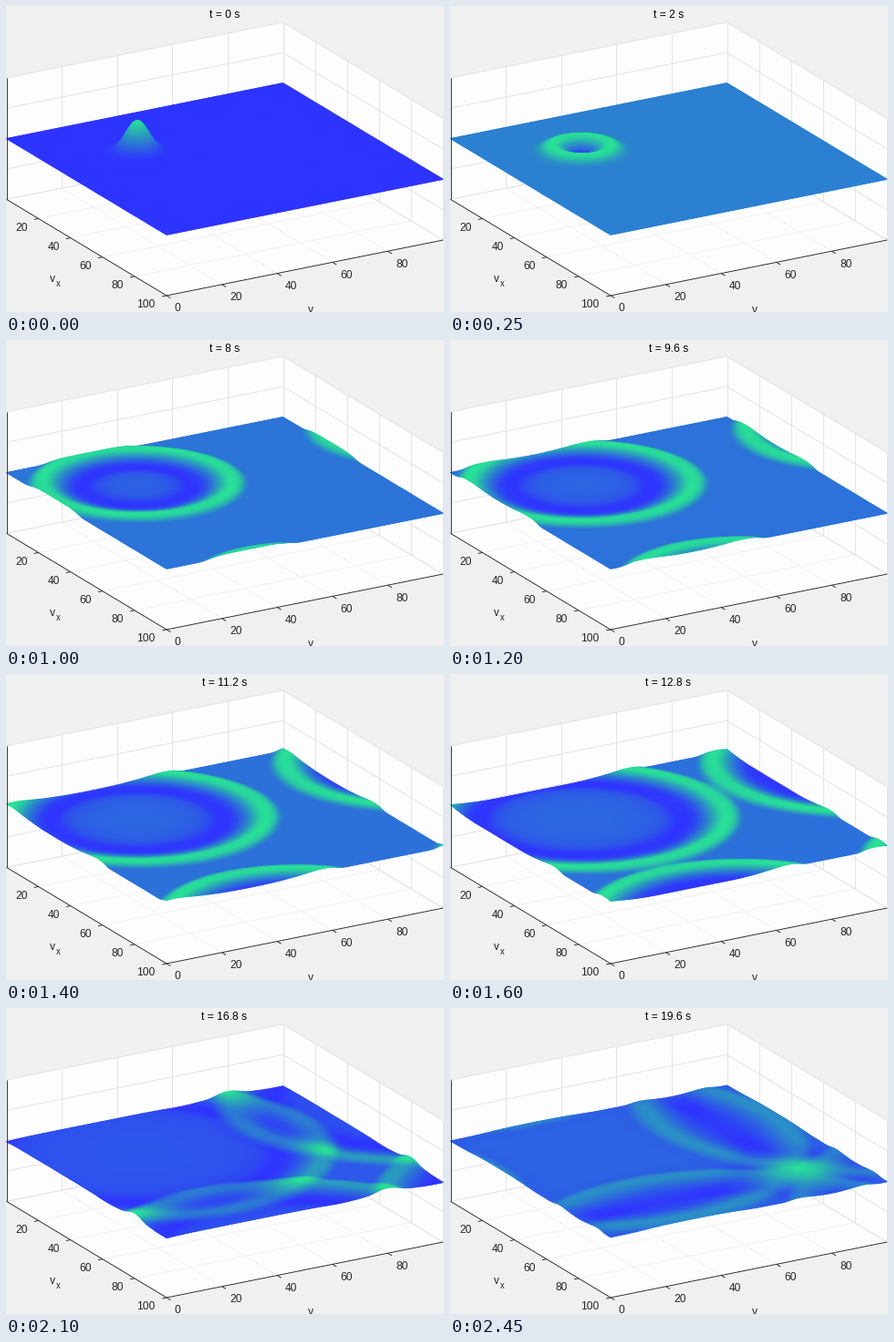
Animation of 480 by 336 pixels, one loop 2500 ms. Source, as a matplotlib script:

```python
import numpy as np
import matplotlib.pyplot as plt
from matplotlib.animation import FuncAnimation
from matplotlib.collections import LineCollection, QuadMesh
from matplotlib.colors import LinearSegmentedColormap

W, H = 480, 336
FRAMES, INTERVAL = 50, 50
DT = 0.4          # simulated seconds per frame
SUBSTEPS = 5
GRAVITY = 9.81
N = 100           # cells per side of the periodic domain
INK = "#262626"

plt.rcParams["font.family"] = "Liberation Sans"
cmap = LinearSegmentedColormap.from_list(
    "sea", [(46/255, 52/255, 1), (40/255, 226/255, 150/255)])


def project(x, y, z):
    """Orthographic view: x, y in 0..100 and z in -1..1 to stage pixels."""
    px = 0.5 + 1.755 * x + 3.03 * y
    py = 145.6 + 1.057 * x - 0.61 * y - 66.7 * z
    return px, py


# Shallow water: limited slopes, local Lax-Friedrichs fluxes, Heun steps
def flux(q):
    h, m, n = q
    u = m / h
    f = np.stack([m, m * u + GRAVITY * h**2 / 2, n * u])
    return f, np.abs(u) + np.sqrt(GRAVITY * h)


def divergence(q):
    """Net outflow of depth, normal and transverse momentum along axis 1."""
    back = q - np.roll(q, 1, axis=1)
    ahead = np.roll(back, -1, axis=1)
    product = np.maximum(back * ahead, 0)
    total = back + ahead
    slope = 2 * product / np.where(product > 0, total, 1)
    left = q + slope / 2
    right = np.roll(q - slope / 2, -1, axis=1)
    (fl, al), (fr, ar) = flux(left), flux(right)
    face = (fl + fr - np.maximum(al, ar) * (right - left)) / 2
    return face - np.roll(face, 1, axis=1)


def swap(q):
    """Exchange the roles of the two directions."""
    return q[[0, 2, 1]].transpose(0, 2, 1)


def rate(q):
    return -divergence(q) - swap(divergence(swap(q)))


def simulate():
    axis = np.arange(N)
    gx, gy = np.meshgrid(axis, axis, indexing="ij")
    q = np.zeros((3, N, N))
    q[0] = 1 + 0.5 * np.exp(-((gx - 30)**2 + (gy - 30)**2) / 25)
    dt = DT / SUBSTEPS
    heights = []
    for _ in range(FRAMES):
        heights.append(np.pad(q[0] - 1, (0, 1), mode="wrap"))
        for _ in range(SUBSTEPS):
            guess = q + dt * rate(q)
            q = (q + guess + dt * rate(guess)) / 2
    return heights


heights = simulate()

fig = plt.figure(figsize=(W / 72, H / 72), dpi=72, facecolor="#f0f0f0")
ax = fig.add_axes([0, 0, 1, 1])
ax.set_xlim(0, W)
ax.set_ylim(H, 0)
ax.axis("off")


def lines(segments, color, width, z):
    paths = [[project(*a), project(*b)] for a, b in segments]
    ax.add_collection(LineCollection(paths, colors=color, linewidths=width, zorder=z),
                      autolim=False)


def label(x, y, s, size=12, color=INK):
    return ax.text(x, y + 0.36 * size, s, size=size, color=color,
                   ha="center", va="baseline", zorder=6)


# White box with its grid
outline = [(0, 0, 1), (0, N, 1), (N, N, 1), (N, N, -1), (N, 0, -1), (0, 0, -1)]
ax.fill(*zip(*[project(*p) for p in outline]), color="#fdfdfd", lw=0, zorder=0)

floor, walls = [], []
for v in range(0, N + 1, 20):
    floor += [((0, v, -1), (N, v, -1)), ((v, 0, -1), (v, N, -1))]
    walls += [((0, v, -1), (0, v, 1)), ((v, N, -1), (v, N, 1))]
for z in (-1, -0.5, 0, 0.5, 1):
    walls += [((0, 0, z), (0, N, z)), ((0, N, z), (N, N, z))]
lines(floor, "#f1f1f1", 0.9, 1)
lines(walls, "#e1e1e1", 0.9, 1)

# Axes, ticks and their labels
lines([((0, 0, -1), (0, 0, 1)), ((0, 0, -1), (N, 0, -1)),
       ((N, 0, -1), (N, N, -1))], INK, 0.9, 5)
ticks = [((v, 0, -1), (v, -1.6, -1)) for v in range(20, N + 1, 20)]
ticks += [((N, v, -1), (N + 2.5, v, -1)) for v in range(0, N, 20)]
lines(ticks, INK, 0.9, 5)

for v in range(20, N + 1, 20):
    px, py = project(v, 0, -1)
    label(px - (18.5 if v < N else 22.5), py + 9, str(v))
for v in range(0, N, 20):
    px, py = project(N, v, -1)
    label(px + (15.5 if v else 12), py + 13, str(v))

label(51, 299, "v")
label(57, 305, "x", 9.5)
label(334, 332.5, "v")
title = label(239.5, 9, "", color="black")

# Rows run from the far corner to the near one, so near cells cover far ones
sx, sy = np.meshgrid(np.arange(N + 1), np.arange(N, -1, -1), indexing="ij")
surface = []


def draw(i):
    u = heights[i][:, ::-1]
    while surface:
        surface.pop().remove()
    coords = np.stack(project(sx, sy, u), axis=-1)
    mesh = QuadMesh(coords, shading="gouraud", cmap=cmap, zorder=3)
    mesh.set_array(u)
    ax.add_collection(mesh, autolim=False)
    surface.append(mesh)
    title.set_text(f"t = {i * DT:g} s")
    return [mesh, title]


anim = FuncAnimation(fig, draw, frames=FRAMES, interval=INTERVAL,
                     init_func=lambda: draw(0), repeat=True, repeat_delay=0)
plt.show()
```
